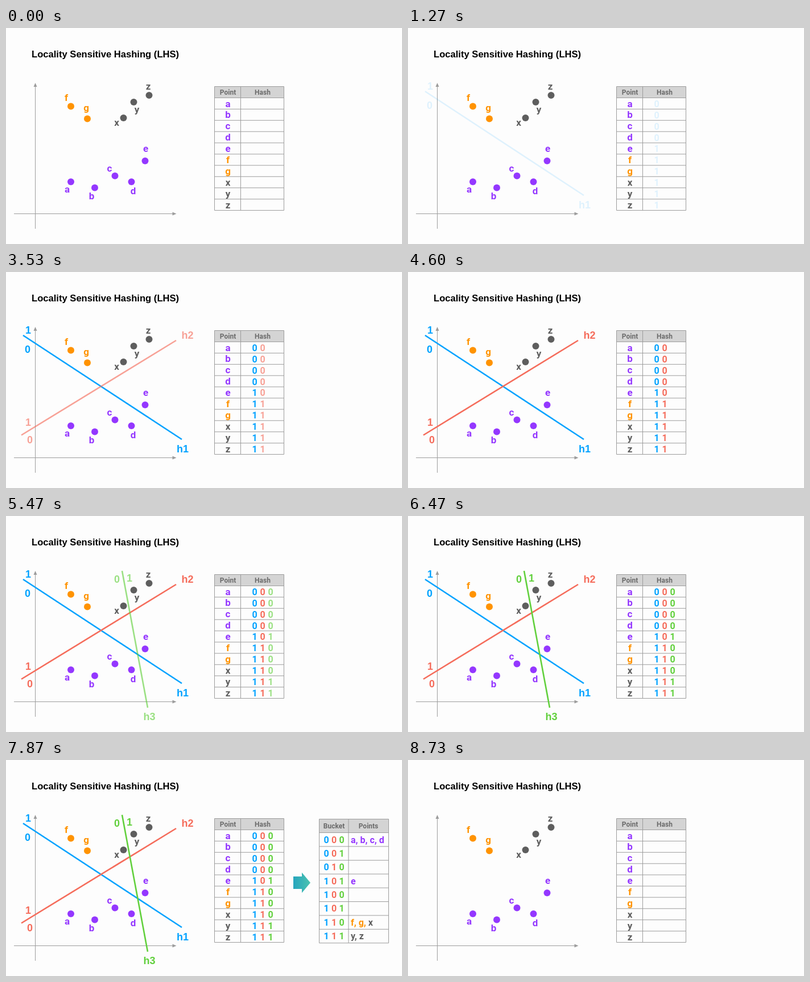
Animation of 696 by 382 pixels, one loop 8.79 s. Source, as an HTML page:

```html
<!DOCTYPE html>
<html lang="en">
<head>
<meta charset="utf-8">
<title>Locality Sensitive Hashing</title>
<style>
  html, body { margin: 0; width: 100%; height: 100%; overflow: hidden; background: #fdfdfd; }
  svg { display: block; }
  text { font: bold 16px Roboto, sans-serif; text-anchor: middle; }
  .title { font: bold 16.6px "Liberation Sans", Arial, sans-serif; text-anchor: start; }
  .mark { font: bold 18px "Liberation Sans", Arial, sans-serif; }
  .name { font-size: 17px; }
  .head { font-size: 12px; fill: #6a6a6a; }
  .left { text-anchor: start; }
  .grid { fill: none; stroke: #9c9c9c; }
</style>
</head>
<body>
<svg id="stage" width="696" height="382" viewBox="0 0 696 382"></svg>
<script>
const LOOP = 8790, RESET = 8670, FADE = 800;
const PURPLE = '#9437ff', ORANGE = '#ff9300', GRAY = '#5e5e5e';
const COLORS = ['#00a2ff', '#f56c5b', '#61d03c'];

// name, dot x, dot y, label x, label baseline, hash
const points = [
  ['a', 114, 272, 107.5, 291, '000'], ['b', 156, 282.5, 150.5, 303, '000'],
  ['c', 191.5, 261.5, 182, 254, '000'], ['d', 220.5, 272, 223.5, 294, '000'],
  ['e', 244.5, 235, 245.5, 219, '101'], ['f', 114, 138.5, 106, 129, '110'],
  ['g', 143, 160.5, 141, 147, '110'], ['x', 206.5, 159, 194.5, 173, '110'],
  ['y', 224.5, 131, 230, 150, '111'], ['z', 251.5, 119, 250, 109, '111']
];

// line ends, then [text, x, baseline] marks
const planes = [
  { start: 1100, line: [30, 112, 309, 296], marks: [['1', 39, 109], ['0', 38, 143], ['h1', 310.5, 319]] },
  { start: 3060, line: [27, 288.5, 299, 121], marks: [['1', 39, 272], ['0', 42, 303], ['h2', 319, 118]] },
  { start: 5000, line: [204, 97, 249, 339], marks: [['0', 195, 118], ['1', 217, 116], ['h3', 252, 361]] }
];

const buckets = [['000', 'abcd'], ['001', ''], ['010', ''], ['101', 'e'],
                 ['100', ''], ['101', ''], ['110', 'fgx'], ['111', 'yz']];

const colorOf = name => name < 'f' ? PURPLE : name < 'x' ? ORANGE : GRAY;
const text = (s, x, y, fill, cls = '') =>
  `<text x="${x}" y="${y}" fill="${fill}" class="${cls}">${s}</text>`;
const group = (id, body) => `<g id="${id}">${body}</g>`;

function table(x, y, split, headHeight, rows, rowHeight, heads) {
  const bottom = y + headHeight + rows * rowHeight, right = x + 122;
  let path = `M${x} ${y}H${right}V${bottom}H${x}ZM${split} ${y}V${bottom}`;
  for (let i = 0; i < rows; i++) path += `M${x} ${y + headHeight + i * rowHeight}H${right}`;
  return `<rect x="${x}" y="${y}" width="122" height="${headHeight}" fill="#d4d4d4"/>
    <path class="grid" d="${path}"/>` +
    heads.map(([s, hx, hy]) => text(s, hx, hy, GRAY, 'head')).join('');
}

const rowY = i => 139.5 + i * 19.9;

const base = text('Locality Sensitive Hashing (LHS)', 45, 52, '#000', 'title') +
  `<path class="grid" d="M51.5 355V103M14 328.5H293"/>
   <path fill="#9c9c9c" d="M51.5 97l3 7h-6zM299.5 328.5l-7 -3v6z"/>` +
  table(366.5, 103.5, 412.5, 20, 10, 19.9, [['Point', 390, 118], ['Hash', 451, 118]]) +
  points.map(([name, x, y, lx, ly], i) => {
    const color = colorOf(name);
    return `<circle cx="${x}" cy="${y}" r="6" fill="${color}"/>` +
      text(name, lx, ly, color, 'name') + text(name, 390, rowY(i), color, 'name');
  }).join('');

const layers = planes.map(({ line: [x1, y1, x2, y2], marks }, k) => group('plane' + k,
  `<path d="M${x1} ${y1}L${x2} ${y2}" stroke="${COLORS[k]}" stroke-width="2.6"/>` +
  marks.map(([s, x, y]) => text(s, x, y, COLORS[k], 'mark')).join('') +
  points.map((p, i) => text(p[5][k], 437 + 14 * k, rowY(i) + 0.3, COLORS[k])).join('')
)).join('');

const bucketTable = group('buckets',
  table(550.5, 104.5, 602, 24, 8, 24.4, [['Bucket', 576.5, 121], ['Points', 637, 121]]) +
  buckets.map(([hash, names], i) => {
    const y = 146.5 + i * 24.35;
    const list = [...names].map((n, j) =>
      `<tspan fill="${colorOf(n)}">${n}${j < names.length - 1 ? ', ' : ''}</tspan>`).join('');
    return [...hash].map((d, k) => text(d, 563 + 13.5 * k, y, COLORS[k])).join('') +
      text(list, 606, y, GRAY, 'left');
  }).join(''));

const arrow = `<linearGradient id="teal"><stop stop-color="#26a5bd"/><stop offset="1" stop-color="#4cc3b0"/></linearGradient>
  <path id="arrow" fill="url(#teal)" d="M505 206h15v-7l15 18l-15 18v-7h-15z"/>`;

const $ = id => document.getElementById(id);
$('stage').innerHTML = base + layers + arrow + bucketTable;

const fades = [
  ...planes.map((p, k) => [$('plane' + k), p.start, FADE]),
  [$('buckets'), 6970, FADE],
  [$('arrow'), 6970, 550]
];

function draw(now) {
  const time = now % LOOP;
  for (const [el, start, length] of fades) {
    const p = Math.min(1, Math.max(0, (time - start) / length));
    el.setAttribute('opacity', time < RESET ? p * p * (3 - 2 * p) : 0);
  }
  requestAnimationFrame(() => draw(performance.now()));
}
draw(performance.now());
</script>
</body>
</html>
```
